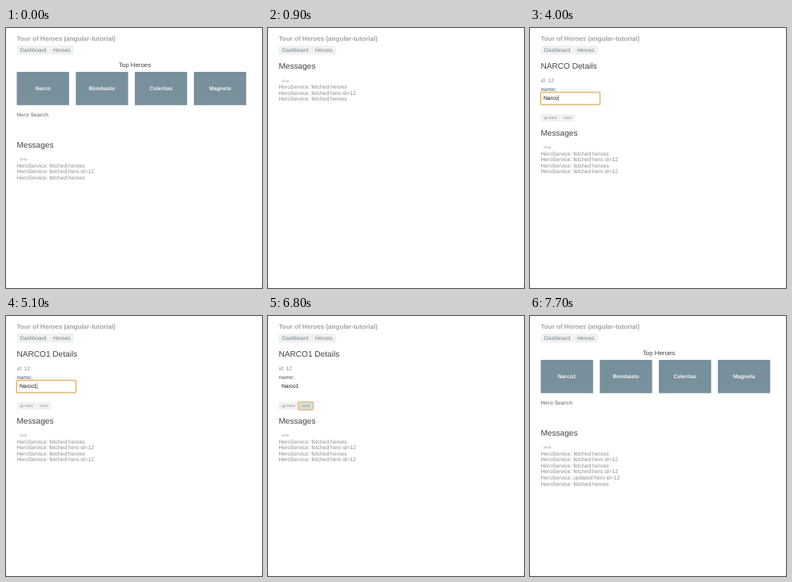
An HTML page for the animation above (8 s loop, 320 by 326 pixels).

```html
<!DOCTYPE html>
<html lang="en">
<head>
<meta charset="utf-8">
<title>Tour of Heroes</title>
<style>
  html, body { margin: 0; width: 100%; height: 100%; overflow: hidden; background: #fff; }
  svg { display: block; width: 320px; height: 326px; }
  text { font: 6.73px "Liberation Sans", Arial, sans-serif; fill: #8c8c8c; text-rendering: geometricPrecision; white-space: pre; }
  .title { font-size: 8.07px; font-weight: bold; fill: #a2a2a2; }
  .nav { fill: #6d8490; }
  .h2 { font-size: 10.1px; fill: #444; }
  .h3 { font-size: 7.87px; fill: #444; text-anchor: middle; }
  .h4 { font-weight: bold; fill: #8c8c8c; }
  .label { font-weight: bold; fill: #78878f; }
  .tile { font-weight: bold; fill: #f6f6f6; text-anchor: middle; }
  .tile.hover { fill: #70858f; }
  .input { fill: #111; }
  .btn { font-size: 4.63px; fill: #8c8c8c; }
  .clear { font: 5px "Liberation Serif", serif; fill: #8c8c8c; }
</style>
</head>
<body>
<svg id="stage" viewBox="0 0 320 326"></svg>
<script>
const LOOP = 8000;
const LEFT = 13.46;
const PALE = '#f1f1f1';
const LOG = ['fetched heroes', 'fetched hero id=12', 'fetched heroes',
  'fetched hero id=12', 'updated hero id=12', 'fetched heroes'];

// Each step changes part of the state from its time on.
const STEPS = [
  [0, { view: 'dashboard', name: 'Narco', log: 3 }],
  [700, { hoverTile: true }],
  [900, { view: 'empty', hoverTile: false }],
  [1400, { view: 'detail', log: 4 }],
  [4000, { focus: 'input', caret: true }],
  [4500, { caret: false }],
  [5000, { caret: true }],
  [5100, { name: 'Narco1' }],
  [5600, { caret: false }],
  [6100, { caret: true }],
  [6400, { hoverSave: true }],
  [6600, { caret: false }],
  [6700, { focus: 'save' }],
  [7200, { view: 'loading', log: 5, focus: '' }],
  [7700, { view: 'dashboard', log: 6 }]
];

const text = (x, y, cls, s) => `<text x="${x}" y="${y}" class="${cls}">${s}</text>`;
const rect = (x, y, w, h, r, fill) =>
  `<rect x="${x}" y="${y}" width="${w}" height="${h}" rx="${r}" fill="${fill}"/>`;
const outline = (x, y, w, h, r, color, width) =>
  `<rect x="${x}" y="${y}" width="${w}" height="${h}" rx="${r}" fill="none" stroke="${color}" stroke-width="${width}"/>`;
const ring = (x, y, w, h) =>
  outline(x, y, w, h, 1.2, '#f2dcb4', 2) + outline(x + .2, y + .2, w - .4, h - .4, 1, '#dcb36c', .9);

function header() {
  return text(LEFT, 15.9, 'title', 'Tour of Heroes (angular-tutorial)') +
    rect(LEFT, 21.9, 41.3, 11.6, 1.7, PALE) + rect(54.76, 21.9, 30.1, 11.6, 1.7, PALE) +
    text(17.66, 30.1, 'nav', 'Dashboard') + text(58.96, 30.1, 'nav', 'Heroes');
}

function messages(y, count) {
  const lines = LOG.slice(0, count).map((m, i) =>
    text(LEFT, y + 24.7 + i * 7.57, '', 'HeroService: ' + m));
  return text(LEFT, y, 'h2', 'Messages') + text(16.9, y + 16.4, 'clear', 'clear') + lines.join('');
}

function tiles(s) {
  return [s.name, 'Bombasto', 'Celeritas', 'Magneta'].map((name, i) => {
    const x = LEFT + i * 73.8;
    const hover = s.hoverTile && i === 0;
    return rect(x, 54.9, 65.4, 41.9, .84, hover ? PALE : '#78909c') +
      text(x + 32.7, 78, hover ? 'tile hover' : 'tile', name);
  }).join('');
}

function dashboard(s) {
  const full = s.view === 'dashboard';
  const shift = full ? 37.3 : 0;
  return text(161, 48.5, 'h3', 'Top Heroes') + (full ? tiles(s) : '') +
    text(LEFT, 74 + shift, 'h4', 'Hero Search') + messages(112.7 + shift, s.log);
}

function detail(s) {
  const caretX = s.name === 'Narco' ? 34.9 : 38.7;
  return text(LEFT, 51.3, 'h2', s.name.toUpperCase() + ' Details') +
    text(LEFT, 68.2, '', 'id: 12') + text(LEFT, 78.6, 'label', 'name:') +
    (s.focus === 'input' ? ring(13.2, 80.6, 74.4, 15.6) : '') +
    text(16.9, 90.4, 'input', s.name) +
    (s.caret ? rect(caretX, 84.2, .5, 7.6, 0, '#222') : '') +
    rect(LEFT, 108, 24.6, 9.4, 1.7, PALE) +
    rect(38.1, 108, 18.2, 9.4, 1.7, s.hoverSave ? '#d5dde1' : PALE) +
    (s.focus === 'save' ? ring(37.8, 107.7, 18.8, 10) : '') +
    text(17.66, 114.4, 'btn', 'go back') + text(42.3, 114.4, 'btn', 'save') +
    messages(135, s.log);
}

function page(s) {
  const body = s.view === 'detail' ? detail(s)
    : s.view === 'empty' ? messages(51.3, s.log) : dashboard(s);
  const corners = '<path d="M0 324a2 2 0 0 0 2 2H0zM320 324a2 2 0 0 1-2 2h2z" fill="#aaa"/>';
  return header() + body + corners;
}

const stage = document.getElementById('stage');
const start = performance.now();
let shown = 0;

function draw(now) {
  const t = Math.max(0, now - start) % LOOP;
  const past = STEPS.filter(([at]) => at <= t);
  if (past.length !== shown) {
    shown = past.length;
    stage.innerHTML = page(Object.assign({}, ...past.map(step => step[1])));
  }
  requestAnimationFrame(draw);
}
draw(start);
</script>
</body>
</html>
```
